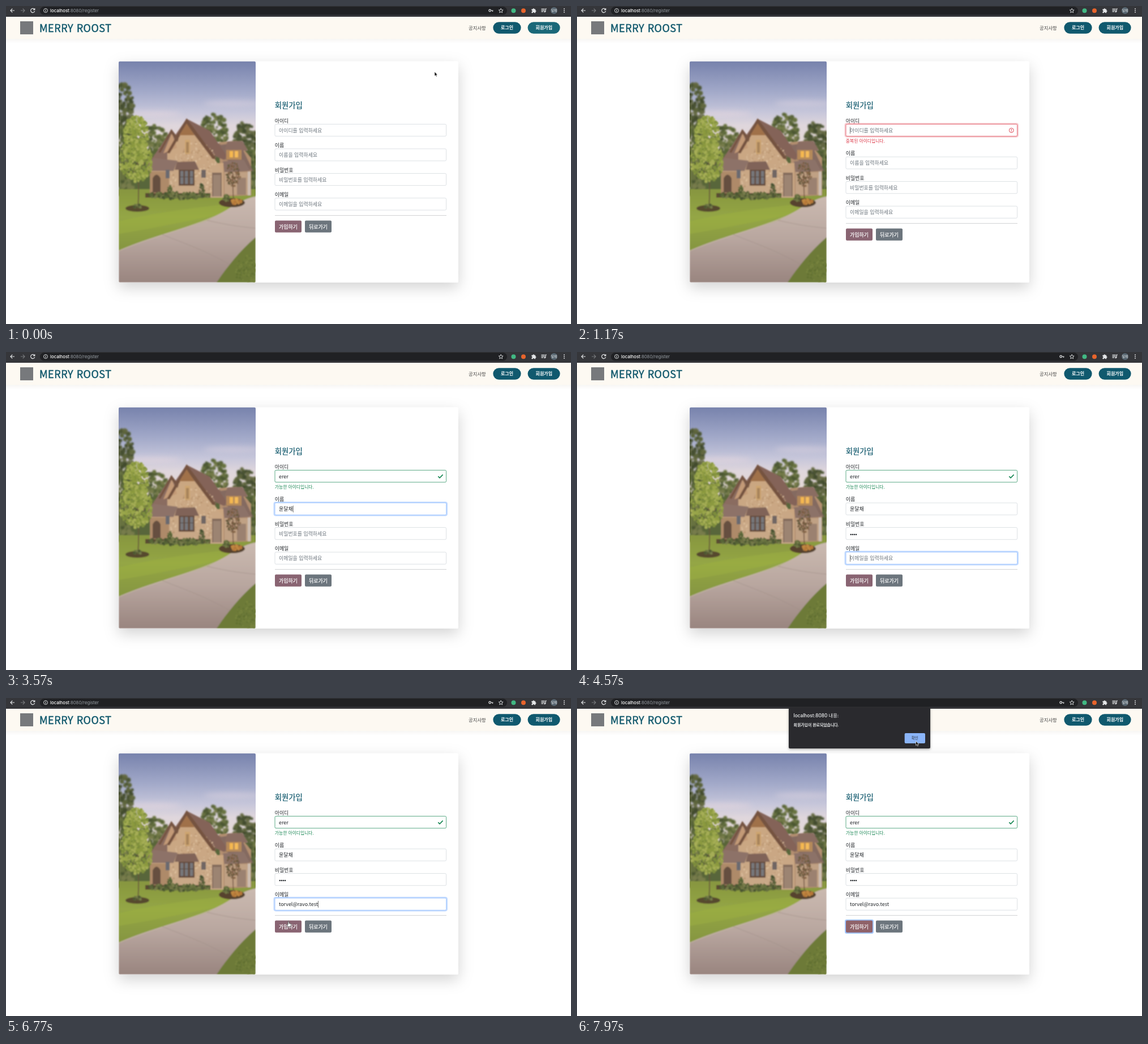
Write an HTML page that moves like this. It is 998x561 px and loops after 8000 ms.

```html
<!DOCTYPE html>
<html lang="ko">
<head>
<meta charset="utf-8">
<title>회원가입</title>
<style>
html, body { margin: 0; width: 100%; height: 100%; overflow: hidden; background: #fff; }
svg { display: block; }
text { font: 8.91px "Noto Sans CJK KR", "Noto Sans KR", "Noto Sans CJK JP", sans-serif; white-space: pre; }
.ui { font-family: Inter, "Noto Sans CJK KR", "Noto Sans CJK JP", sans-serif; }
.line { fill: none; stroke: #e4e6e8; stroke-width: 1.2; }
.medium { stroke-width: .22px; }
</style>
</head>
<body>
<svg width="998" height="561" viewBox="0 0 998 561">
  <defs>
    <filter id="cardShadow" x="-20%" y="-20%" width="140%" height="150%"><feDropShadow dx="0" dy="8.9" stdDeviation="13" flood-opacity=".175"/></filter>
    <filter id="popupShadow" x="-20%" y="-20%" width="140%" height="150%"><feDropShadow dx="0" dy="1.5" stdDeviation="2" flood-opacity=".35"/></filter>
    <filter id="soft"><feGaussianBlur stdDeviation=".8"/></filter>
    <filter id="far"><feGaussianBlur stdDeviation="1.5"/></filter>
    <filter id="haze" x="-30%" y="-150%" width="160%" height="400%"><feGaussianBlur stdDeviation="5"/></filter>
    <linearGradient id="barShade" x2="0" y2="1"><stop stop-color="#f7f6f4"/><stop offset="1" stop-color="#fff"/></linearGradient>
    <linearGradient id="sky" x2="0" y2="1"><stop stop-color="#7782ac"/><stop offset=".3" stop-color="#a2a9c9"/><stop offset=".5" stop-color="#c6c6da"/><stop offset=".63" stop-color="#dfd6dc"/><stop offset="1" stop-color="#ecdcd4"/></linearGradient>
    <linearGradient id="grass" x2="0" y2="1"><stop stop-color="#87963f"/><stop offset=".3" stop-color="#94a645"/><stop offset="1" stop-color="#77863d"/></linearGradient>
    <linearGradient id="drive" x2="0" y2="1"><stop stop-color="#cbbab0"/><stop offset=".5" stop-color="#b8a69f"/><stop offset="1" stop-color="#99857f"/></linearGradient>
    <linearGradient id="brick" x2="0" y2="1"><stop stop-color="#cba680"/><stop offset="1" stop-color="#c8a888"/></linearGradient>
    <clipPath id="photoEdge"><rect x="199" y="97.7" width="242" height="390" rx="2"/></clipPath>
  </defs>

  <rect width="998" height="19" fill="#35363a"/>
  <rect x="60" y="1" width="825" height="14.6" rx="7.3" fill="#202124"/>
  <g class="line">
    <path d="M15 8H8M11.3 4.7 8 8l3.3 3.3"/>
    <path d="M26 8h7M29.7 4.7 33 8l-3.3 3.3" stroke="#77797c"/>
    <path d="M50 5.6A3.6 3.6 0 1 0 50.7 9M50.8 4v2.7H48"/>
    <circle cx="70" cy="8" r="3.5" stroke-width=".9"/><path d="M70 7.5v2.3M70 5.7v.9"/>
    <path d="m874.2 4.3 1.1 2.6 2.8.2-2.1 1.9.6 2.8-2.4-1.5-2.4 1.5.6-2.8-2.1-1.9 2.8-.2z" stroke-width=".9"/>
    <path d="M945.5 5.3h6.2M945.5 7.6h6.2M945.5 9.9h3.8M953 10V5h2"/>
  </g>
  <circle cx="896.5" cy="8.3" r="4" fill="#41b883"/>
  <circle cx="914" cy="8.3" r="4" fill="#e8642c"/>
  <path d="M928.4 5.5h2.2a1.3 1.3 0 0 1 2.6 0h2v2.2a1.3 1.3 0 0 1 0 2.6v2h-2a1.2 1.2 0 0 0-2.4 0h-2.4v-2.2a1.2 1.2 0 0 0 0-2.4z" fill="#e4e6e8"/>
  <circle cx="951.7" cy="10" r="1.3" fill="#e4e6e8"/>
  <circle cx="968" cy="8" r="6" fill="#566570"/>
  <text x="968" y="10" text-anchor="middle" style="font-size:5.4px" fill="#eee">달채</text>
  <g fill="#e4e6e8"><circle cx="986" cy="5" r=".9"/><circle cx="986" cy="8" r=".9"/><circle cx="986" cy="11" r=".9"/></g>
  <text class="ui" x="78" y="10.9" style="font-size:7.75px" fill="#9aa0a6"><tspan fill="#fff" style="font-weight:500">localhost</tspan>:8080/register</text>

  <rect y="58" width="998" height="8" fill="url(#barShade)"/>
  <rect y="19" width="998" height="39" fill="#fdf9f2"/>
  <rect x="25" y="27" width="23" height="23" fill="#77797c"/>
  <text class="medium" x="59" y="45.7" style="font-size:18px;letter-spacing:.5px;stroke-width:.45px" fill="#10586c" stroke="#10586c">MERRY ROOST</text>
  <text x="817" y="41.7" style="font-size:8.4px" fill="#444">공지사항</text>
  <rect x="860.4" y="28.3" width="49.2" height="20.4" rx="10.2" fill="#10596e"/>
  <rect id="joinLink" x="921.6" y="28.3" width="57" height="20.4" rx="10.2"/>
  <g fill="#fff" text-anchor="middle" style="font-weight:700">
    <text x="885" y="41.4" style="font-size:8px;font-weight:700">로그인</text><text x="950.3" y="41.4" style="font-size:8px;font-weight:700">회원가입</text>
  </g>

  <rect x="199" y="97.7" width="600" height="390" rx="2" fill="#fff" filter="url(#cardShadow)"/>
  <g id="photo" clip-path="url(#photoEdge)"></g>
  <text class="medium" x="474.7" y="179.5" style="font-size:13.37px" fill="#10586c" stroke="#10586c">회원가입</text>
  <g id="live"></g>
</svg>
<script>
const $ = id => document.getElementById(id);
const rect = (x, y, w, h, fill, more = '') => `<rect x="${x}" y="${y}" width="${w}" height="${h}" fill="${fill}" ${more}/>`;
const poly = (points, fill) => `<polygon points="${points}" fill="${fill}"/>`;
const path = (d, more) => `<path d="${d}" ${more}/>`;
const text = (x, y, str, fill, style = '', more = '') => `<text x="${x}" y="${y}" fill="${fill}" style="${style}" ${more}>${str}</text>`;

let seed = 11;
const random = () => (seed = seed * 16807 % 2147483647) / 2147483647;
function leaves(cx, cy, rx, ry, count, size, colors) {
  let out = '';
  for (let i = 0; i < count; i++) {
    const a = random() * 2 * Math.PI, r = Math.sqrt(random());
    const x = cx + rx * r * Math.cos(a), y = cy + ry * r * Math.sin(a);
    out += `<circle cx="${x.toFixed(1)}" cy="${y.toFixed(1)}" r="${(size * (.5 + random())).toFixed(1)}" fill="${colors[i % colors.length]}"/>`;
  }
  return out;
}

function photo() {
  const dark = ['#4c5534', '#5b633b', '#424b2f', '#666b45'], mid = ['#687241', '#596537', '#777c4b', '#4c5732'];
  const bright = ['#8b993f', '#9aa64b', '#7c8c3c', '#a6ae56'], stone = ['#d9bb99', '#b8946f', '#caa783', '#dfc3a3'];
  return rect(199, 97, 242, 180, 'url(#sky)')
    + '<g filter="url(#haze)" opacity=".55"><ellipse cx="250" cy="190" rx="60" ry="4" fill="#efdcdf"/><ellipse cx="400" cy="172" rx="50" ry="5" fill="#dcd3e0"/></g>'
    + '<g filter="url(#far)">'
    + rect(199, 255, 242, 80, '#59663a')
    + leaves(206, 182, 19, 46, 170, 2.8, dark) + leaves(212, 268, 24, 62, 200, 4, mid)
    + leaves(263, 245, 28, 34, 200, 2.8, mid) + leaves(367, 223, 25, 34, 200, 2.8, mid)
    + leaves(423, 240, 20, 36, 180, 2.8, dark) + leaves(437, 290, 8, 38, 60, 3, mid) + '</g>'
    + '<g filter="url(#soft)">'
    + rect(199, 323, 242, 165, 'url(#grass)')
    + path('M199 380C260 365 350 352 441 346V352C350 375 270 390 199 402Z', 'fill="#a0b63f" opacity=".35"')
    // right wing
    + poly('376,240 408,238 433,268 433,334 380,336', '#b28e70')
    + poly('350,228 380,245 412,240 437,292 386,270', '#846a60')
    + poly('386,255 391,239 418,238 427,255', '#8a6d62')
    + rect(389, 254, 27, 17, '#b58a5a') + rect(395, 256, 6, 11, '#f5b84f') + rect(404, 256, 6, 11, '#f5bb5a')
    + poly('383,274 420,271 431,291 386,294', '#8c7268')
    + rect(386, 293, 45, 40, '#c0a184') + rect(408, 303, 16, 30, '#9b8170') + rect(427, 292, 5, 42, '#cdbeb2')
    // main block
    + poly('282,252 319,199 360,220 389,263 386,272 362,262', '#846459')
    + poly('251,279 292,219 322,255 312,280', '#8a6c60')
    + rect(254, 277, 130, 61, 'url(#brick)')
    + poly('285,258 319,206 366,266 382,290 382,338 285,336', 'url(#brick)')
    + poly('278,260 293,224 302,250', '#c39a77')
    + leaves(335, 272, 36, 32, 170, 1.2, stone) + leaves(350, 310, 29, 24, 110, 1.2, stone) + leaves(279, 310, 23, 20, 90, 1.2, stone)
    + poly('319,198 284,259 289,260 319,209 365,270 372,270', '#74523f')
    + poly('292,217 269,258 273,259 292,225 303,240 305,234', '#765443')
    + poly('319,207 306,228 333,228', '#a0714a') + rect(316, 236, 9, 25, '#cda570') + rect(318, 240, 5, 19, '#a8845b')
    + poly('302,275 334,274 341,289 298,289', '#806358')
    + rect(305, 289, 28, 28, '#634a3b')
    + [308, 316, 325].map(x => rect(x, 291, 5.5, 23, '#77777a') + rect(x, 301, 5.5, 1, '#493a31')).join('')
    + poly('244,291 260,268 303,273 296,291', '#8d7267')
    + rect(254, 292, 34, 38, '#ae8a69') + path('M259 329V304Q266 291 273 304V329Z', 'fill="#665040"')
    + rect(282, 289, 7, 15, '#6b6b70') + rect(345, 289, 8, 14, '#6f6664')
    + rect(364, 294, 17, 42, '#836b5b') + rect(366, 298, 13, 38, '#9c8472')
    // planting
    + rect(246, 330, 115, 8, '#5a4b33') + leaves(306, 334, 55, 6, 150, 2, mid)
    + leaves(346, 325, 4, 13, 40, 1.7, dark) + leaves(289, 325, 4, 9, 30, 1.7, mid)
    + path('M441 336C414 341 400 356 358 377C310 395 250 408 199 432V488H372C390 461 414 431 441 408Z', 'fill="url(#drive)"')
    + path('M199 432C260 404 350 388 410 350', 'fill="none" stroke="#c7b7a6" stroke-width="1.2"')
    + path('M276 403C315 419 350 430 395 456M355 378C385 385 408 389 441 392', 'fill="none" stroke="#a08f87" stroke-width=".7"')
    + path('M372 488C390 461 414 431 441 408V488Z', 'fill="#6d7a38"')
    + leaves(426, 468, 20, 28, 110, 1.4, ['#79853f', '#606f33'])
    + '<ellipse cx="399" cy="347" rx="23" ry="8" fill="#57432f"/>'
    + path('M402 346Q400 320 401 295M401 320L392 297M401 314L412 288', 'stroke="#614535" stroke-width="1.3" fill="none"')
    + leaves(401, 298, 13, 22, 110, 1.4, ['#75593f', '#866648', '#605a3c'])
    + leaves(389, 339, 5, 7, 35, 1.8, mid) + leaves(407, 345, 9, 4, 35, 1.8, ['#c28b43', '#b67739'])
    // front tree
    + '<ellipse cx="232" cy="357" rx="21" ry="6" fill="#56482f"/>'
    + path('M233 357Q236 320 232 275M234 310L220 278M234 303L248 267', 'stroke="#67573b" stroke-width="1.8" fill="none"')
    + leaves(230, 228, 21, 34, 330, 2.2, bright) + leaves(230, 272, 30, 38, 400, 2.2, bright)
    + leaves(232, 353, 8, 3, 20, 1.6, mid) + '</g>';
}

const GAP = 43.45, ERROR_SHIFT = 14.2;
const BLUE = '#86b7fe', RED = '#dc3545', GREEN = '#198754';
const LABELS = ['아이디', '이름', '비밀번호', '이메일'];
const HINTS = ['아이디를 입력하세요', '이름을 입력하세요', '비밀번호를 입력하세요', '이메일을 입력하세요'];
const USERS = ['tulmo', 'qwbrnlke47', 'admin', 'torvelane2@zmail.test', 'dfd', 'd'];

// Each entry is [step, value]; the latest one reached applies.
const TYPING = [
  [[0, ''], [3, 'tul'], [4, 'tulmo'], [6, ''], [7, 'e'], [8, 'er'], [9, 'ere'], [10, 'erer']],
  [[0, ''], [14, 'ㅇ'], [15, '유'], [16, '윤'], [17, '윤달'], [18, '윤달채']],
  [[0, ''], [20, '•'], [21, '•••'], [22, '••••']],
  [[0, ''], [25, 'to'], [26, 'torv'], [27, 'torvel'], [29, 'torvel@'], [30, 'torvel@rav'], [31, 'torvel@ravo.te'], [32, 'torvel@ravo.test']],
];
const FOCUS = [[0, -1], [2, 0], [12, 1], [19, 2], [23, 3], [35, 4]];
const POINTER = [[0, ['arrow', 757, 116]], [1, ['arrow', 655, 178]], [2, ['beam', 584.5, 220]], [3, null],
  [32, ['arrow', 584, 307]], [33, ['arrow', 522, 378]], [34, ['hand', 499, 394]],
  [37, ['arrow', 512, 340]], [38, ['arrow', 555, 190]], [39, ['arrow', 592, 96]], [40, ['arrow', 598.5, 76]]];
const at = (track, step) => track.filter(([from]) => from <= step).pop()[1];

const SHAPES = {
  arrow: path('M0 0V7.6L1.7 6.1 2.9 8.8 4.2 8.2 3 5.6H5.3Z', 'fill="#111" stroke="#fff" stroke-width=".6"'),
  beam: path('M-1.6-4Q0-4 0-3V3Q0 4-1.6 4M1.6-4Q0-4 0-3V3Q0 4 1.6 4', 'fill="none" stroke="#333" stroke-width=".9"'),
  hand: path('M-.8 0Q.3-.8.9.4V3.6L4 4.3Q5 4.7 4.6 6L3.8 9.6H-.6L-3 6Q-2.7 4.8-1 6.1Z', 'fill="#fff" stroke="#333" stroke-width=".7"'),
};

function field(i, top, step, focused) {
  const value = at(TYPING[i], step);
  const state = i || step < 4 ? '' : step < 8 ? RED : GREEN;
  const border = state || (focused ? BLUE : '#ced4da');
  const ring = focused ? rect(473.6, top - 1.1, 305.3, 23.4, 'none', `rx="3" stroke="${state || '#0d6efd'}" stroke-opacity=".25" stroke-width="2.2"`) : '';
  const dots = [...value].map((_, k) => `<circle cx="${483.7 + k * 3.1}" cy="${top + 12.4}" r="1.2" fill="#212529"/>`).join('');
  let out = text(474.7, top - 2.9, LABELS[i], '#212529') + ring
    + rect(475, top, 302.6, 21.2, '#fff', `rx="2" stroke="${border}" stroke-width=".7"`);
  if (i === 2 && value) out += dots;
  else out += text(482, top + 14.3, value || HINTS[i], value ? '#212529' : '#6c757d', '', focused ? 'id="typed"' : '');
  if (focused) out += rect(482 + (i === 2 ? value.length * 3.1 : 0), top + 4.8, .6, 12, '#222', 'id="caret"');
  if (state === RED) out += path(`M767.3 ${top + 8.5}v3.2m0 1.2v1`, `stroke="${RED}"`)
    + `<circle cx="767.3" cy="${top + 10.8}" r="3.9" fill="none" stroke="${RED}" stroke-width=".9"/>`;
  if (state === GREEN) out += path(`M763.3 ${top + 10.8}l2.8 2.8 5.5-5.8`, `fill="none" stroke="${GREEN}" stroke-width="1.7"`);
  if (state) out += text(474.8, 240.8, state === RED ? '중복된 아이디입니다.' : '가능한 아이디입니다.', state, 'font-size:7.8px');
  return out;
}

function dropdown(step) {
  const users = step === 2 ? USERS : USERS.slice(0, 1);
  return rect(474.7, 231.3, 107, 8.6 + users.length * 20, '#282c2d', 'rx="2" filter="url(#popupShadow)"')
    + users.map((name, k) => text(481.3, 248 + k * 20, name, '#f1f3f4', 'font-size:7.2px;font-weight:600', 'class="ui"')).join('');
}

const dialog = () => rect(374, 16.5, 250, 72.5, '#292b2e', 'rx="2" filter="url(#popupShadow)"')
  + text(382.6, 34.2, 'localhost:8080 내용:', '#f1f3f4', 'font-size:8.3px;font-weight:500', 'class="ui"')
  + text(382.6, 50.3, '회원가입이 완료되었습니다.', '#f1f3f4', 'font-size:6.9px', 'class="medium" stroke="#f1f3f4"')
  + rect(578.7, 62, 36.3, 18, '#8ab4f8', 'rx="2"')
  + text(596.7, 73.4, '확인', '#2b3038', 'font-size:6.5px', 'text-anchor="middle"');

const button = (x, y, label, fill) => rect(x, y, 47, 21.2, fill, 'rx="2"')
  + text(x + 23.5, y + 14.2, label, '#fff', '', 'class="medium" stroke="#fff" text-anchor="middle"');

function draw(step) {
  const focus = at(FOCUS, step), shift = step >= 4 ? ERROR_SHIFT : 0, pointer = at(POINTER, step);
  const buttonTop = 378.4 + shift;
  let out = LABELS.map((_, i) => field(i, 208.5 + i * GAP + (i ? shift : 0), step, focus === i)).join('')
    + rect(475, 369 + shift, 303, .7, '#bfc1c3');
  if (focus === 4) out += rect(473.1, buttonTop - 1.9, 50.8, 25, '#9fc3fe', 'rx="3"');
  out += button(475, buttonTop, '가입하기', focus === 4 ? '#8f6269' : '#896472')
    + button(528, buttonTop, '뒤로가기', '#6c757d');
  if (step <= 2 || step >= 20) out += '<circle cx="854.7" cy="8" r="1.8" fill="none" stroke="#e4e6e8" stroke-width="1.2"/>'
    + path('M856.5 8H860.5M859.5 8V10', 'fill="none" stroke="#e4e6e8" stroke-width="1.2"');
  if (step === 2 || step === 3) out += dropdown(step);
  if (step >= 36) out += dialog();
  if (pointer) out += `<g transform="translate(${pointer[1]} ${pointer[2]})">${SHAPES[pointer[0]]}</g>`;
  $('live').innerHTML = out;
  $('joinLink').setAttribute('fill', step ? '#10596e' : '#1a6878');
  if ($('typed') && at(TYPING[focus], step)) $('caret').setAttribute('x', 482.3 + $('typed').getComputedTextLength());
}

$('photo').innerHTML = photo();
let shown = -1;
function tick() {
  const time = performance.now() % 8000;
  const step = Math.max(0, Math.floor((time - 170) / 200) + 1);
  if (step !== shown) draw(shown = step);
  requestAnimationFrame(tick);
}
tick();
</script>
</body>
</html>
```
